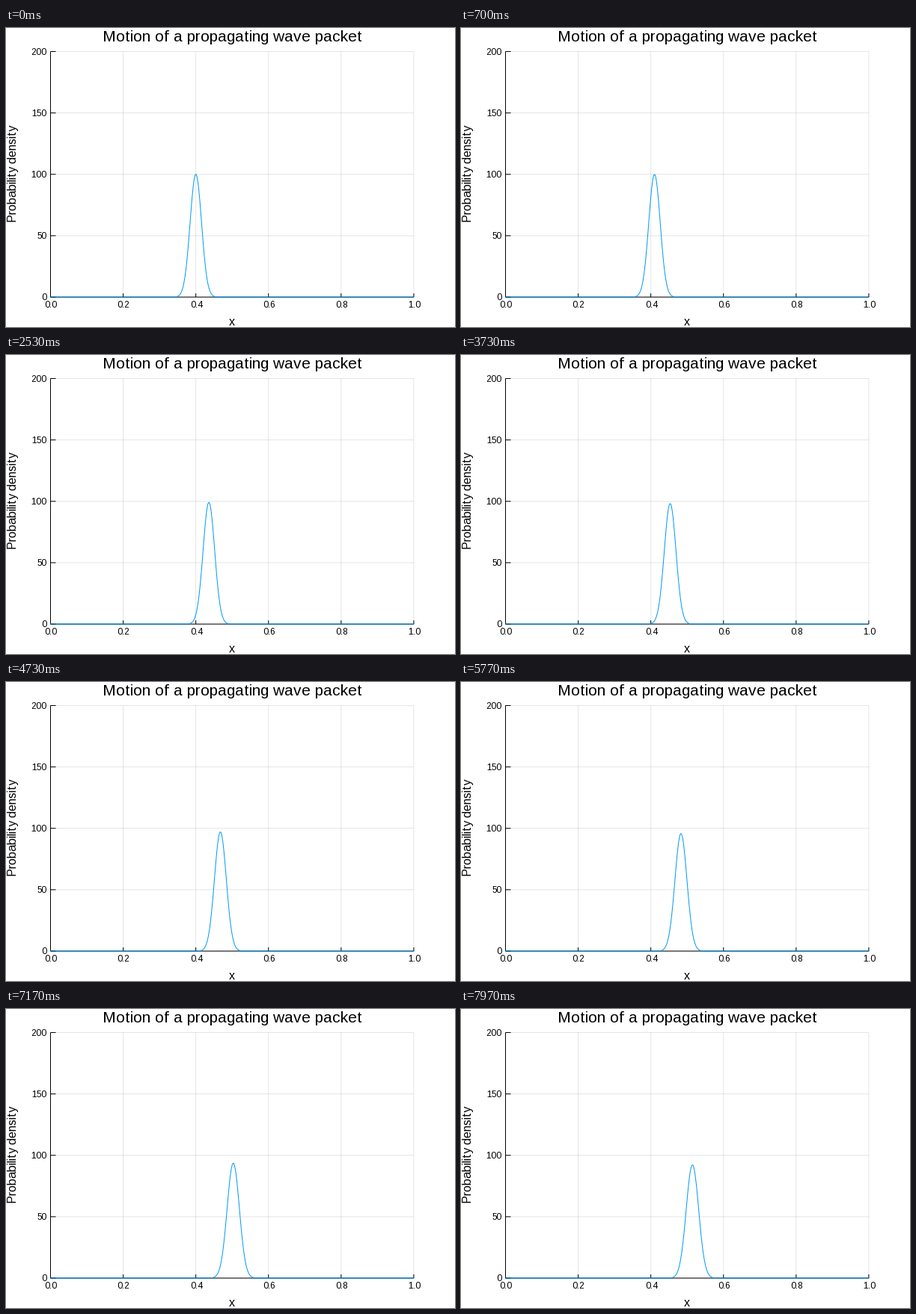
Recreate the animation shown at these times as a matplotlib script. Size 600 by 400 pixels, loop 8000 ms.

```python
import numpy as np
import matplotlib as mpl
import matplotlib.pyplot as plt
from matplotlib.animation import FuncAnimation

W, H, DPI = 600, 400, 100
FRAMES, LOOP_MS = 240, 8000
LEFT, RIGHT, TOP, BOTTOM = 59.5, 544.9, 31.5, 360.0

mpl.rcParams.update({
    "font.family": "Liberation Sans",
    "text.hinting": "force_autohint",
    "text.hinting_factor": 1,
    "text.kerning_factor": 6,
    "path.simplify": False,
})

# Lattice wave packet: grid step, wave number, time step, initial variance
DX, K, DT, VAR = 0.001, 500, 1e-6, 1 / 4000
SPEED = np.sin(K * DX) / DX
SPREAD = np.cos(K * DX) / (2 * VAR)


def pt(px):
    return px * 72 / DPI


def density(x, t):
    growth = 1 + (SPREAD * t) ** 2
    center = 0.4 + SPEED * t
    return 100 / np.sqrt(growth) * np.exp(-(x - center) ** 2 / (2 * VAR * growth))


fig = plt.figure(figsize=(W / DPI, H / DPI), dpi=DPI, facecolor="white")
stage = fig.add_axes([0, 0, 1, 1])
stage.set_xlim(0, W)
stage.set_ylim(H, 0)
stage.axis("off")


def segment(x0, y0, x1, y1, **style):
    stage.plot([x0, x1], [y0, y1], solid_capstyle="butt", snap=False, **style)


def label(x, y, text, px, ha="center", **kw):
    stage.text(x, y, text, fontsize=pt(px), ha=ha, va="baseline", color="black", **kw)


def to_px(x, y):
    return LEFT + x * (RIGHT - LEFT), BOTTOM - y / 200 * (BOTTOM - TOP)


grid = dict(color="black", alpha=0.1, lw=pt(1), zorder=1)
axis = dict(color="black", lw=pt(1), zorder=2)

for i in range(6):
    gx = to_px(i / 5, 0)[0]
    segment(gx, TOP, gx, BOTTOM, **grid)
    segment(gx, BOTTOM, gx, BOTTOM - 5, **axis)
    label(gx + 0.5, 374, f"{i / 5:.1f}", 12)

for value in range(0, 201, 50):
    gy = to_px(0, value)[1]
    segment(LEFT, gy, RIGHT, gy, **grid)
    segment(LEFT, gy, LEFT + 7, gy, **axis)
    label(54.5, round(gy + 4), str(value), 12, ha="right")

segment(LEFT, BOTTOM, RIGHT, BOTTOM, **axis)
segment(LEFT, TOP, LEFT, BOTTOM, **axis)

label(302.5, 18, "Motion of a propagating wave packet", 21)
label(302, 398, "x", 16)
label(14, 195.5, "Probability density", 16, rotation=90, rotation_mode="anchor")

xs = np.arange(0, 1 + DX / 2, DX)
curve, = stage.plot([], [], color="#009AFA", lw=pt(1), snap=False, zorder=3)


def draw(n):
    curve.set_data(*to_px(xs, density(xs, n * DT)))
    return curve,


anim = FuncAnimation(fig, draw, frames=FRAMES, interval=LOOP_MS / FRAMES,
                     init_func=lambda: draw(0), repeat=True, repeat_delay=0)
plt.show()
```
